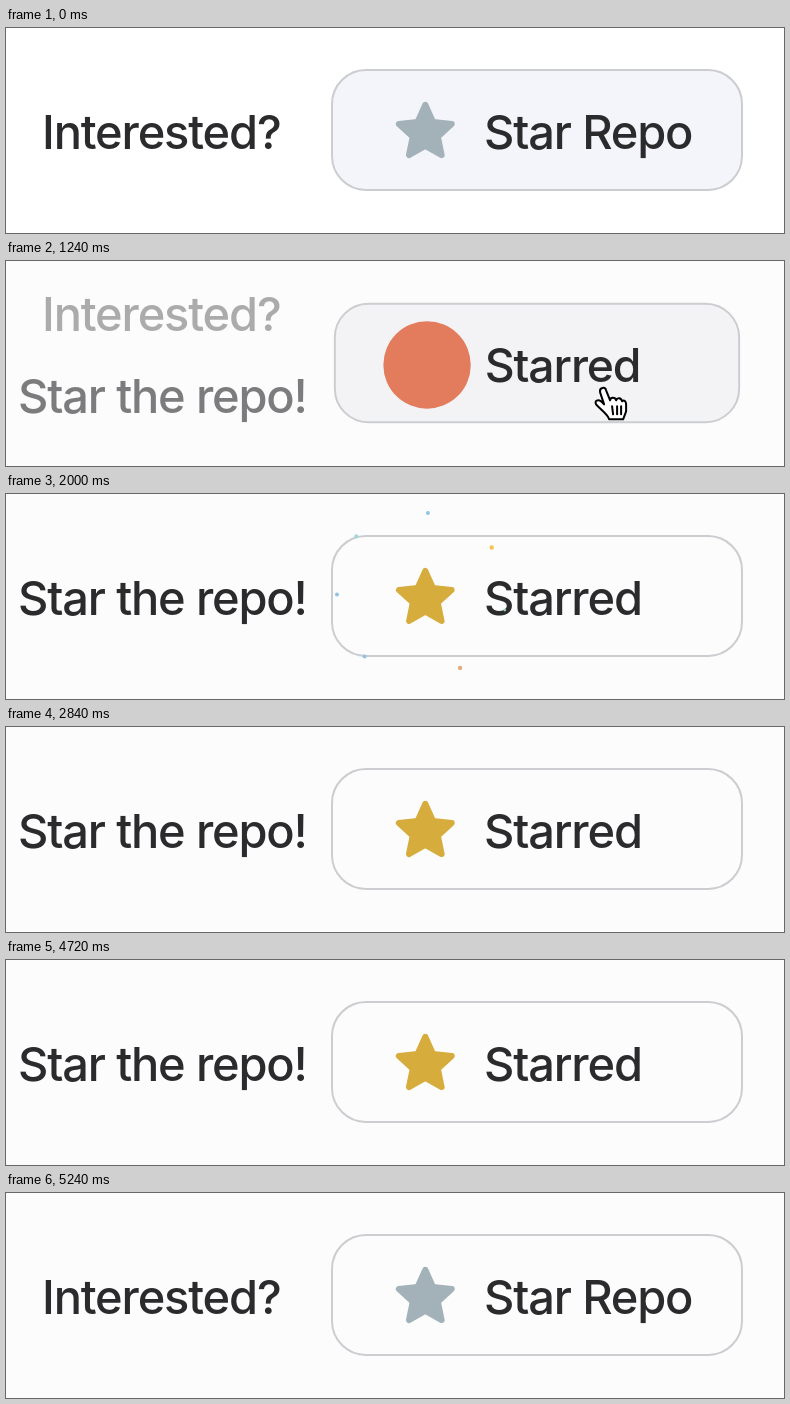
An HTML page with a canvas that plays this animation: 778 by 205 pixels, repeating every 5.26 s.

```html
<!DOCTYPE html>
<html lang="en">
<head>
<meta charset="utf-8">
<title>Star button</title>
<style>
  html, body { margin: 0; width: 100%; height: 100%; overflow: hidden; background: #fff; }
  canvas { display: block; width: 778px; height: 205px; }
</style>
</head>
<body>
<canvas id="stage"></canvas>
<script>
const W = 778, H = 205, LOOP = 5260;
const CLICK = 1140, RESET = 4740;
const STAR = { x: 419.3, y: 104.6 };
const INK = '#2b2b2d', GRAY = '#a3b1b8', GOLD = '#d6ad3c';

const canvas = document.getElementById('stage');
const ctx = canvas.getContext('2d');
const dpr = window.devicePixelRatio || 1;
canvas.width = W * dpr;
canvas.height = H * dpr;

// angle in degrees, final distance, size, colour
const SPARKS = [
  [-88, 83, 1, '#8fc4e6'], [-36, 82.5, 1.1, '#f3c44f'], [10, 81, 0.7, '#8fd0b4'],
  [64, 80, 1.1, '#e5a982'], [135, 85.5, 1, '#8fc4e6'], [181, 88, 1, '#93c3e0'],
  [221, 91, 1, '#9fd8d4']
];

const HAND = new Path2D('M-4 5C-5 0 1-1 2 3L6 13C6 10 11 9 12 13C13 10 17 10 18 14' +
  'C20 12 22 14 22 17L22 24L19 32L5 32C4 27-4 22-8 17C-10 13-6 12-3 14L0 17Z');
const HAND_LINES = new Path2D('M8 19L9 27M13 19L13 27M17 19L17 27');
const ARROW = new Path2D('M0 0V32L7 25L12 36L17 34L12 23H22Z');

const clamp = v => Math.min(1, Math.max(0, v));
const span = (t, a, b) => clamp((t - a) / (b - a));
const mix = (a, b, p) => a + (b - a) * p;
const easeOut = (p, n = 3) => 1 - (1 - p) ** n;
const smooth = p => p * p * (3 - 2 * p);

function mixColor(a, b, p) {
  return `rgb(${a.map((v, i) => Math.round(mix(v, b[i], p))).join(',')})`;
}

// Places the left edge of the ink, not the advance box, at x.
function text(str, x, y, alpha = 1) {
  ctx.globalAlpha = alpha;
  ctx.font = '500 47px Inter, "Liberation Sans", sans-serif';
  ctx.letterSpacing = '-1.17px';
  ctx.fillStyle = INK;
  ctx.fillText(str, x + ctx.measureText(str).actualBoundingBoxLeft, y);
  ctx.globalAlpha = 1;
}

function star(color, scale) {
  if (scale <= 0) return;
  ctx.save();
  ctx.translate(STAR.x, STAR.y);
  ctx.scale(scale, scale);
  ctx.beginPath();
  for (let i = 0; i < 10; i++) {
    const r = i % 2 ? 13.2 : 27.8, a = (i / 5 - 0.5) * Math.PI;
    ctx.lineTo(r * Math.cos(a), r * Math.sin(a));
  }
  ctx.closePath();
  ctx.fillStyle = ctx.strokeStyle = color;
  ctx.lineWidth = 6;
  ctx.lineJoin = 'round';
  ctx.fill();
  ctx.stroke();
  ctx.restore();
}

function ring(t) {
  const outer = 55 * easeOut(span(t, CLICK, 1380));
  const inner = 55 * easeOut(span(t, 1270, 1540), 2.0);
  if (t < CLICK || inner >= outer) return;
  ctx.beginPath();
  ctx.arc(419.5, 104, outer, 0, 2 * Math.PI);
  ctx.arc(419.5, 104, inner, 0, 2 * Math.PI, true);
  ctx.fillStyle = mixColor([222, 104, 70], [237, 164, 138], span(t, CLICK, 1440));
  ctx.fill();
}

function sparks(t) {
  const p = span(t, 1450, 2200);
  if (p <= 0 || p >= 1) return;
  const reach = mix(0.55, 1, easeOut(span(t, 1450, 2000)));
  for (const [deg, dist, size, color] of SPARKS) {
    const a = deg * Math.PI / 180;
    ctx.beginPath();
    ctx.arc(419 + dist * reach * Math.cos(a), 102 + dist * reach * Math.sin(a),
      7.5 * size * (1 - p), 0, 2 * Math.PI);
    ctx.fillStyle = color;
    ctx.fill();
  }
}

function pop(t) {
  const s = (t - 1415) / 1000;
  return s <= 0 ? 0 : 1 - Math.exp(-9 * s) * Math.cos(11 * s);
}

function button(t, starred) {
  const rest = [244, 245, 250], hover = [238, 237, 242], idle = [252, 252, 252];
  const press = smooth(span(t, 770, 920)) - smooth(span(t, CLICK, 1320));
  const scale = 1 - 0.034 * press;
  ctx.save();
  ctx.translate(531, 102);
  ctx.scale(scale, scale);
  ctx.translate(-531, -102);

  ctx.beginPath();
  ctx.roundRect(326, 42, 410, 120, 34);
  ctx.fillStyle = t < CLICK
    ? mixColor(rest, hover, span(t, 560, 700))
    : mixColor(hover, idle, span(t, CLICK, 1400));
  ctx.fill();
  ctx.strokeStyle = '#cccdd0';
  ctx.lineWidth = 2;
  ctx.stroke();

  text(starred ? 'Starred' : 'Star Repo', 480, 121);
  ring(t);
  star(starred ? GOLD : GRAY, starred ? pop(t) : 1);
  ctx.restore();
}

function slide(t, start, from, fromX, to, toX) {
  const p = span(t, start, start + 480);
  const e = easeOut(p, 4);
  if (p < 1) text(from, fromX, 121 - 84 * e, 1 - e);
  text(to, toX, 121 + 80 * (1 - e), e);
}

function caption(t) {
  const ask = ['Interested?', 39], call = ['Star the repo!', 14];
  if (t < CLICK) text(...ask, 121);
  else if (t < RESET) slide(t, CLICK, ...ask, ...call);
  else slide(t, RESET, ...call, ...ask);
}

function cursor(t) {
  if (t < 360 || t > 1500) return;
  const enter = easeOut(span(t, 360, 860));
  const leave = span(t, 1150, 1460) ** 2;
  const x = mix(632, 595, enter) + 36 * leave;
  const y = mix(212, 119, enter) + 85 * leave;
  ctx.save();
  ctx.translate(x, y);
  ctx.lineJoin = ctx.lineCap = 'round';
  if (y < 162) {
    ctx.fillStyle = '#fff';
    ctx.strokeStyle = '#000';
    ctx.lineWidth = 2;
    ctx.fill(HAND);
    ctx.stroke(HAND);
    ctx.stroke(HAND_LINES);
  } else {
    ctx.strokeStyle = '#fff';
    ctx.lineWidth = 4;
    ctx.stroke(ARROW);
    ctx.fillStyle = '#000';
    ctx.fill(ARROW);
  }
  ctx.restore();
}

function draw(t) {
  ctx.setTransform(dpr, 0, 0, dpr, 0, 0);
  ctx.fillStyle = t < CLICK ? '#fff' : '#fcfcfc';
  ctx.fillRect(0, 0, W, H);
  button(t, t >= CLICK && t < RESET);
  caption(t);
  sparks(t);
  cursor(t);
}

const start = performance.now();
function tick() {
  draw((performance.now() - start) % LOOP);
  requestAnimationFrame(tick);
}
tick();
</script>
</body>
</html>
```
